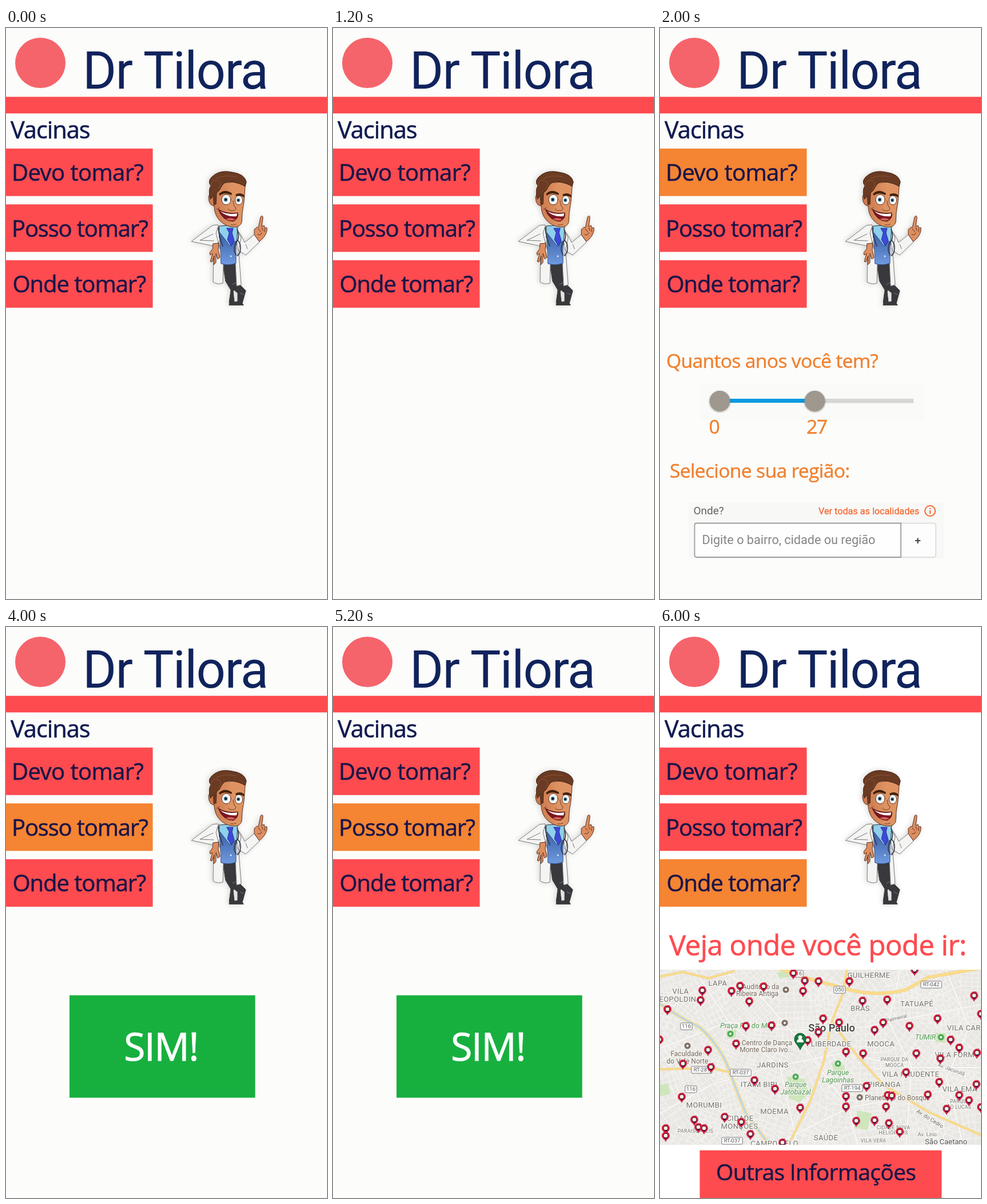
Write an HTML page that moves like this. It is 561 px wide and 998 px high and loops after 8000 ms.

```html
<!DOCTYPE html>
<html lang="pt">
<head>
<meta charset="utf-8">
<title>Vacinas</title>
<style>
html, body { margin: 0; width: 100%; height: 100%; overflow: hidden; background: #fcfcfa; }
svg { display: block; width: 100%; height: 100%; }
text { white-space: pre; }
.sans { font-family: "Open Sans", "Noto Sans", sans-serif; }
.ui { font-family: Roboto, Arial, sans-serif; }
.area { fill: #74746f; letter-spacing: .4px; }
.halo { paint-order: stroke; stroke: #f6f5f2; stroke-width: 2.5px; stroke-linejoin: round; text-anchor: middle; }
</style>
</head>
<body>
<svg id="stage" viewBox="0 0 561 998">
  <defs>
    <linearGradient id="vest" x1="0" y1="0" x2="0" y2="1">
      <stop offset="0" stop-color="#3a5fa6"/><stop offset="1" stop-color="#6f9be0"/>
    </linearGradient>
    <linearGradient id="skin">
      <stop offset="0" stop-color="#cd7b50"/><stop offset=".6" stop-color="#df9362"/>
    </linearGradient>
    <filter id="soft" x="-20%" y="-20%" width="140%" height="140%">
      <feDropShadow dx="-2" dy="0" stdDeviation="5" flood-color="#000" flood-opacity=".16"/>
    </filter>
    <filter id="knobShade" x="-30%" y="-30%" width="160%" height="160%">
      <feDropShadow dx="0" dy="1" stdDeviation="1.5" flood-color="#000" flood-opacity=".4"/>
    </filter>
    <clipPath id="mapClip"><rect y="599" width="561" height="306"/></clipPath>
    <g id="pin">
      <path d="M0 10C-2 6-8-5 4-8-1A8 8 0 0 1 8-1C8 4 2 6 0 10Z" fill="#4b1a5c"/>
      <path d="M0 9C-1.500 6-7 4-7-1A7 7 0 0 1 7-1C7 4 1.500 6 0 9Z" fill="#e0213c"/>
      <path d="M0 5.500C-2 4-4.400 2-4.400-1A4.400 4.400 0 0 1 4.400-1C4.400 2 2 4 0 5.500Z" fill="#351650"/>
      <circle cy="-1" r="3.3" fill="#fff3d8"/>
    </g>
  </defs>

  <rect id="page" width="561" height="998"/>
  <circle cx="60" cy="61" r="44" fill="#f5646b"/>
  <text class="ui" x="134" y="105.500" font-size="90" letter-spacing="-1.5" fill="#10235c">Dr Tilora</text>
  <rect y="120.300" width="561" height="29" fill="#fd4b4f"/>
  <g id="menu"></g>

  <g id="doctor" filter="url(#soft)" stroke="#3b3534" stroke-width="1" stroke-linejoin="round" stroke-linecap="round">
    <g fill="#38383c">
      <path d="M388 412L403 411L404 444L419 459L413 481L405 479L405 463L391 452Z"/>
      <path d="M379 411L398 413L401 450L397 461L399 479L390 480L393 458L384 443Z"/>
      <path d="M390 484L391 478Q396 476 400 479L405 478Q412 478 415 484Z"/>
    </g>
    <path d="M396 448L404 444M409 463L415 466" stroke="#77777b" fill="none"/>
    <g fill="#f4f4f3" stroke="#77777a">
      <path d="M371 374L363 380L362 444Q370 449 379 446L380 412Z"/>
      <path d="M400 350L413 372L407 396L411 449L403 451L401 411Z"/>
      <path d="M370 344L361 345L324 373L362 381L373 374L374 354Z"/>
      <path d="M402 352Q410 358 417 375L434 361L443 374L419 397L405 388Z"/>
      <path d="M362 360L339 371L363 372M419 378L422 386" fill="none"/>
    </g>
    <path d="M373 346L405 344L403 379L393 384L373 367Z" fill="#8fd0ec"/>
    <path d="M374 358L391 380L402 372L402 411Q389 416 376 412Z" fill="url(#vest)" stroke="#34508c"/>
    <path d="M386 350L397 350L395 358L399 372L394 381L387 370L390 358Z" fill="#3d48d8" stroke="#2a338f"/>
    <path d="M371 346L367 359L377 398M403 349L411 367L404 398" fill="none" stroke="#77777a"/>
    <path d="M371 349Q372 366 379 381M404 352Q408 362 405 371Q398 377 399 390L402 397M405 371Q412 378 409 392L405 398" fill="none" stroke="#353b46" stroke-width="1.700"/>
    <circle cx="393" cy="399" r="1.4" fill="#eee" stroke="none"/>
    <g fill="#dd8e60" stroke="#5a3020">
      <path d="M362 377L372 376L371 388L374 401L370 404L367 394L367 410L363 414L364 398L360 409L357 408L361 394L357 397L356 393L361 386Z"/>
      <path d="M434 361L434 352L439 348L441 349L445 330Q449 326 449 332L447 347L451 345L452 349L456 349L456 354Q454 365 443 373Z"/>
      <path d="M441 351L445 356M447 349L449 354M452 351L452 356M440 361Q445 363 447 358" fill="none"/>
    </g>
    <path d="M361 291Q354 288 354 297Q355 311 364 311Z" fill="#cd7a50" stroke="#5a3020"/>
    <path d="M363 283Q372 268 390 270Q408 266 418 276L416 303L413 322L412 339Q410 348 398 348Q384 347 374 337Q365 328 364 314Z" fill="url(#skin)" stroke="#5a3020"/>
    <path d="M357 299Q353 283 358 276Q350 266 365 256Q377 248 395 252Q417 255 420 269L418 277Q409 271 394 269Q381 267 376 278Q373 285 368 288L367 308L363 308L363 293Z" fill="#6b3a24" stroke="#3f2115"/>
    <path d="M358 276Q358 266 368 266Q381 270 372 281M368 263Q382 256 402 260" fill="none" stroke="#8a5437"/>
    <g fill="#fff" stroke="#5a3020">
      <ellipse cx="385" cy="300" rx="8" ry="9"/>
      <ellipse cx="407" cy="301" rx="6.500" ry="8"/>
    </g>
    <g stroke="none">
      <circle cx="384" cy="300" r="3.7" fill="#6ca5bb"/><circle cx="406" cy="301" r="3.4" fill="#6ca5bb"/>
      <circle cx="384" cy="300" r="2.2" fill="#171717"/><circle cx="406" cy="301" r="2" fill="#171717"/>
    </g>
    <path d="M372 290Q382 280 395 289L394 292Q382 286 374 293ZM401 291Q410 286 417 293L416 296Q409 291 402 294Z" fill="#42210f" stroke="none"/>
    <path d="M397 302Q397 310 402 315Q400 321 394 319Q389 320 389 316" fill="#df9465" stroke="#723d27"/>
    <path d="M371 317Q386 326 405 323Q407 333 397 338Q379 338 371 317Z" fill="#7d1720" stroke="#4b1b16"/>
    <path d="M374 320Q387 327 404 324L403 329Q386 331 374 320Z" fill="#fff" stroke="none"/>
    <path d="M384 334Q393 330 401 335Q393 339 384 334Z" fill="#dc6259" stroke="none"/>
    <path d="M368 317L373 314M393 344Q398 345 402 343" fill="none" stroke="#723d27"/>
  </g>

  <g id="form">
    <rect x="70" y="622" width="392" height="63" fill="#fafaf8"/>
    <rect x="122" y="648" width="132" height="7" fill="#0a99df"/>
    <rect x="270" y="648" width="173" height="7.5" fill="#d6d6d5"/>
    <g fill="#9e988f" filter="url(#knobShade)">
      <circle cx="104.500" cy="652" r="18"/><circle cx="270.500" cy="652" r="18"/>
    </g>
    <rect x="50" y="830" width="447" height="98" fill="#f8f8f7"/>
    <path d="M421 865.500H478Q482 865.500 482 870V920Q482 925 478 925H421" fill="#fdfdfd" stroke="#d6d6d6" stroke-width="1.500"/>
    <path d="M421 865.500H64Q60.500 865.500 60.500 869V921Q60.500 925 64 925H421Z" fill="#fefefe" stroke="#9c9c9c" stroke-width="1.800"/>
    <g class="ui">
      <text x="58.500" y="850" font-size="19" fill="#636363">Onde?</text>
      <text x="277" y="850" font-size="16.200" fill="#f5662f" stroke="#f5662f" stroke-width=".25">Ver todas as localidades</text>
      <text x="73.500" y="902" font-size="21.600" fill="#858585">Digite o bairro, cidade ou região</text>
      <text x="450.500" y="902" font-size="19" font-weight="500" text-anchor="middle" fill="#444">+</text>
    </g>
    <circle cx="472" cy="844" r="9" fill="none" stroke="#f5662f" stroke-width="2"/>
    <path d="M472 839V841M472 843V849" stroke="#f5662f" stroke-width="2"/>
  </g>

  <g id="answer"><rect x="111" y="643.700" width="324.500" height="179" fill="#17b03f"/></g>

  <g id="places">
    <g id="map" clip-path="url(#mapClip)"></g>
    <rect x="69.500" y="914.700" width="422.700" height="84" fill="#fd4b4f"/>
  </g>
</svg>

<script>
const $ = id => document.getElementById(id);
const RED = '#fd4b4f', ORANGE = '#f58433', NAVY = '#1a1548';

function add(parent, tag, attrs, content) {
  const el = document.createElementNS('http://www.w3.org/2000/svg', tag);
  for (const k in attrs) el.setAttribute(k, attrs[k]);
  if (content) el.textContent = content;
  parent.appendChild(el);
  return el;
}
// A hairline stroke gives the regular weight a little more body
function label(parent, str, x, y, size, spacing, fill) {
  return add(parent, 'text', {
    class: 'sans', x, y, 'font-size': size, 'letter-spacing': spacing, fill, stroke: fill, 'stroke-width': size * .014
  }, str);
}

label($('menu'), 'Vacinas', 8, 193, 41.5, -1, '#0f1a50');
const buttons = [['Devo tomar?', -.6, 10], ['Posso tomar?', -1.2, 10], ['Onde tomar?', -1.05, 11.5]]
  .map(([str, spacing, x], i) => {
    const y = 210.7 + i * 97.6;
    const box = add($('menu'), 'rect', { y, width: 256.5, height: 83 });
    label($('menu'), str, x, y + 56.5, 40, spacing, NAVY);
    return box;
  });

const form = $('form');
label(form, 'Quantos anos você tem?', 11, 594, 33.7, -.7, '#f0802f');
label(form, 'Selecione sua região:', 17, 786, 33.7, -.7, '#f0802f');
label(form, '0', 85.5, 709, 33.7, 0, '#f0802f');
label(form, '27', 256, 709, 33.7, -1.5, '#f0802f');
label($('answer'), 'SIM!', 206, 758, 68, -1.5, '#fff');
label($('places'), 'Veja onde você pode ir:', 16, 574, 49, -.5, RED);
label($('places'), 'Outras Informações', 98, 967, 39, -.7, NAVY);

function buildMap() {
  const map = $('map');
  let seed = 17;
  const rnd = () => (seed = seed * 16807 % 2147483647) / 2147483647;
  const line = (d, stroke, width) => add(map, 'path', { d, stroke, 'stroke-width': width, fill: 'none', 'stroke-linejoin': 'round' });

  add(map, 'rect', { y: 599, width: 561, height: 306, fill: '#e9e7e3' });

  // Patches of small parallel streets
  for (let i = 0; i < 90; i++) {
    const x = (i % 13) * 46 + rnd() * 24 - 12, y = 605 + Math.floor(i / 13) * 48 + rnd() * 20;
    const a = rnd() * 90, step = 7 + rnd() * 4;
    let d = '';
    for (let k = -3; k <= 3; k++) d += `M-31 ${k * step}H31M${k * step * 1.3} -30V30`;
    line(d, '#f5f4f1', 1).setAttribute('transform', `translate(${x} ${y}) rotate(${a})`);
  }

  add(map, 'path', { fill: '#cfe6bd', d: 'M222 785L252 790L260 815L244 831L225 824ZM300 762L322 766L325 781L305 784ZM481 709L500 710L498 727L482 725ZM115 706L134 704L132 718L118 719ZM345 845L370 850L362 880L340 875ZM0 800L14 797L18 816L0 820ZM205 604L224 600L226 612L208 614Z' });

  const river = 'M-5 655Q30 680 70 700Q108 735 122 778Q137 818 150 850L195 910';
  const avenues = ['M0 737L120 690L230 705L350 700L561 660', 'M0 850L90 800L190 770L320 745L440 770L561 770',
    'M60 599L120 690L210 770L240 905', 'M420 599L400 690L440 770L430 905', 'M200 905L330 840L470 815L561 800',
    'M110 599L180 650L245 725L330 840L345 905', 'M500 599L540 700L500 790L530 905'];
  avenues.forEach(d => { line(d, '#dedcd7', 3); line(d, '#fbfaf8', 2.2); });
  line(river, '#f8e2a0', 7.5);
  line(river, '#bcd7e8', 3.5);
  ['M-5 612L40 603L85 614L130 601', 'M190 590L250 612L320 631Q375 648 430 634L470 612L561 596',
    'M327 599L318 645L300 690L286 760L262 830L222 910', 'M300 690L345 750L390 800L470 848L561 888',
    'M0 773L90 771L122 778'].forEach((d, i) => {
    const w = i === 1 ? 5 : 3.2;
    line(d, '#eac97f', w + .8);
    line(d, '#fadc8c', w);
  });

  const write = (str, x, y, size, fill, turn) => {
    const el = add(map, 'text', { class: 'ui halo' + (fill ? '' : ' area'), x, y, 'font-size': size }, str);
    if (fill) el.setAttribute('fill', fill);
    if (turn) el.setAttribute('transform', `rotate(${turn} ${x} ${y})`);
  };
  const shield = (str, x, y) => {
    const w = str.length * 5.4 + 4;
    add(map, 'rect', { x: x - w / 2, y: y - 6, width: w, height: 12, rx: 2, fill: '#fff', stroke: '#777' });
    add(map, 'text', { class: 'ui', x, y: y + 3.4, 'font-size': 9.5, 'text-anchor': 'middle', fill: '#555' }, str);
  };

  [['LAPA', 101, 627], ['VILA', 36, 641], ['EOPOLDIN', 31, 655], ['BRÁS', 350, 671], ['TATUAPÉ', 449, 663],
    ['GUILHERME', 365, 613], ['VILA CAR', 531, 705], ['LIBERDADE', 299, 733], ['MOOCA', 386, 733],
    ['JARDINS', 197, 770], ['VILA FORM', 515, 752], ['VILA PRUDENTE', 438, 786], ['ITAIM BIBI', 173, 804],
    ['IPIRANGA', 390, 804], ['MORUMBI', 77, 840], ['MOEMA', 200, 851], ['VILA EMA', 524, 812],
    ['CIDADE', 140, 863], ['MONÇÕES', 139, 877], ['CAMPO BELO', 200, 907], ['SAÚDE', 290, 897]]
    .forEach(([s, x, y]) => write(s, x, y, 13));
  [['PARQUE DA', 410, 759], ['MOOCA', 410, 769], ['CIDADE NOVA', 408, 878], ['HELIÓPOLIS', 408, 887],
    ['VILA VERA', 373, 901], ['PARAISÓPOLIS', 62, 884], ['PARQUE', 524, 832], ['SÃO LUCAS', 520, 842]]
    .forEach(([s, x, y]) => write(s, x, y, 8.5));
  [['Auditório da', 176, 633], ['Ribeira Antiga', 170, 645], ['Centro de Dança', 187, 731], ['Monte Claro Ivo...', 186, 743],
    ['Faculdade', 46, 750], ['do Vale Norte', 48, 763], ['Planetário do Bosque', 415, 827]]
    .forEach(([s, x, y]) => write(s, x, y, 12, '#75695f'));
  [['Praça Rio do Mel', 151, 701], ['Parque', 237, 804], ['Jatobazal', 237, 817], ['Parque', 311, 783],
    ['Lagoinhas', 311, 796], ['TUMIR', 464, 721]]
    .forEach(([s, x, y]) => add(map, 'text', { class: 'ui halo', x, y, 'font-size': 12.5, 'font-style': 'italic', fill: '#4e9a51' }, s));
  write('Av. do Cedro', 470, 862, 9.5, '#666', 32);
  write('Av. Jacurutã', 508, 776, 9, '#777', 20);
  write('R. Palmeiral', 409, 688, 9, '#777', -14);
  write('Av. Lírio', 467, 890, 9.5, '#777');
  write('São Caetano', 500, 904, 13, '#55555a');
  add(map, 'text', { class: 'ui halo', x: 300, y: 707, 'font-size': 18, 'font-weight': 500, fill: '#3d3d3d' }, 'São Paulo');

  [['RT-042', 474, 625], ['RT-281', 73, 774], ['RT-037', 141, 779], ['RT-037', 126, 898], ['RT-194', 336, 806],
    ['116', 46, 698], ['116', 54, 808], ['116', 240, 606], ['050', 314, 634]].forEach(s => shield(...s));
  [[220, 634, '#7d6d62'], [218, 692, '#7d6d62'], [48, 732, '#7d6d62'], [349, 822, '#7d6d62'],
    [123, 711, '#4eaa55'], [311, 763, '#4eaa55'], [491, 717, '#4eaa55'], [237, 786, '#4eaa55']].forEach(([cx, cy, fill]) => {
    add(map, 'circle', { cx, cy, r: 5.5, fill });
    add(map, 'circle', { cx, cy, r: 2, fill: '#fff' });
  });

  [[233, 606], [253, 619], [277, 620], [331, 620], [445, 600], [74, 636], [71, 653], [125, 637], [140, 628],
    [181, 629], [156, 655], [250, 637], [13, 669], [354, 654], [397, 652], [549, 645], [285, 685], [313, 692],
    [277, 709], [258, 723], [150, 698], [195, 697], [133, 729], [84, 740], [375, 705], [390, 692], [436, 698],
    [485, 685], [508, 722], [523, 736], [325, 743], [355, 746], [448, 746], [490, 755], [554, 745], [40, 764],
    [89, 770], [430, 779], [165, 793], [201, 808], [38, 822], [361, 803], [325, 821], [325, 839], [395, 839],
    [398, 819], [405, 820], [468, 818], [488, 796], [553, 800], [523, 819], [540, 828], [501, 843], [245, 841],
    [113, 857], [142, 866], [158, 887], [60, 862], [67, 875], [77, 877], [10, 877], [10, 890], [343, 864],
    [375, 863], [400, 868], [419, 883], [214, 902], [561, 677], [-1, 722], [561, 840]]
    .forEach(([x, y]) => add(map, 'use', { href: '#pin', x, y }));

  add(map, 'path', { d: 'M245 739C242 731 235 728 235 720A10 10 0 0 1 255 720C255 728 248 731 245 739Z', fill: '#147a3d', stroke: '#0b5629' });
  add(map, 'path', { d: 'M239 726Q239 721 243 720A3.500 3.500 0 1 1 247 720Q251 721 251 726Z', fill: '#fff' });
}
buildMap();

const panels = [null, $('form'), $('answer'), $('places')];
function draw(time) {
  const step = Math.floor(time % 8000 / 2000);
  panels.forEach((p, i) => p && p.setAttribute('display', i === step ? 'inline' : 'none'));
  buttons.forEach((b, i) => b.setAttribute('fill', i + 1 === step ? ORANGE : RED));
  $('page').setAttribute('fill', step === 3 ? '#fff' : '#fcfcfa');
}
function tick() {
  draw(performance.now());
  requestAnimationFrame(tick);
}
tick();
</script>
</body>
</html>
```
